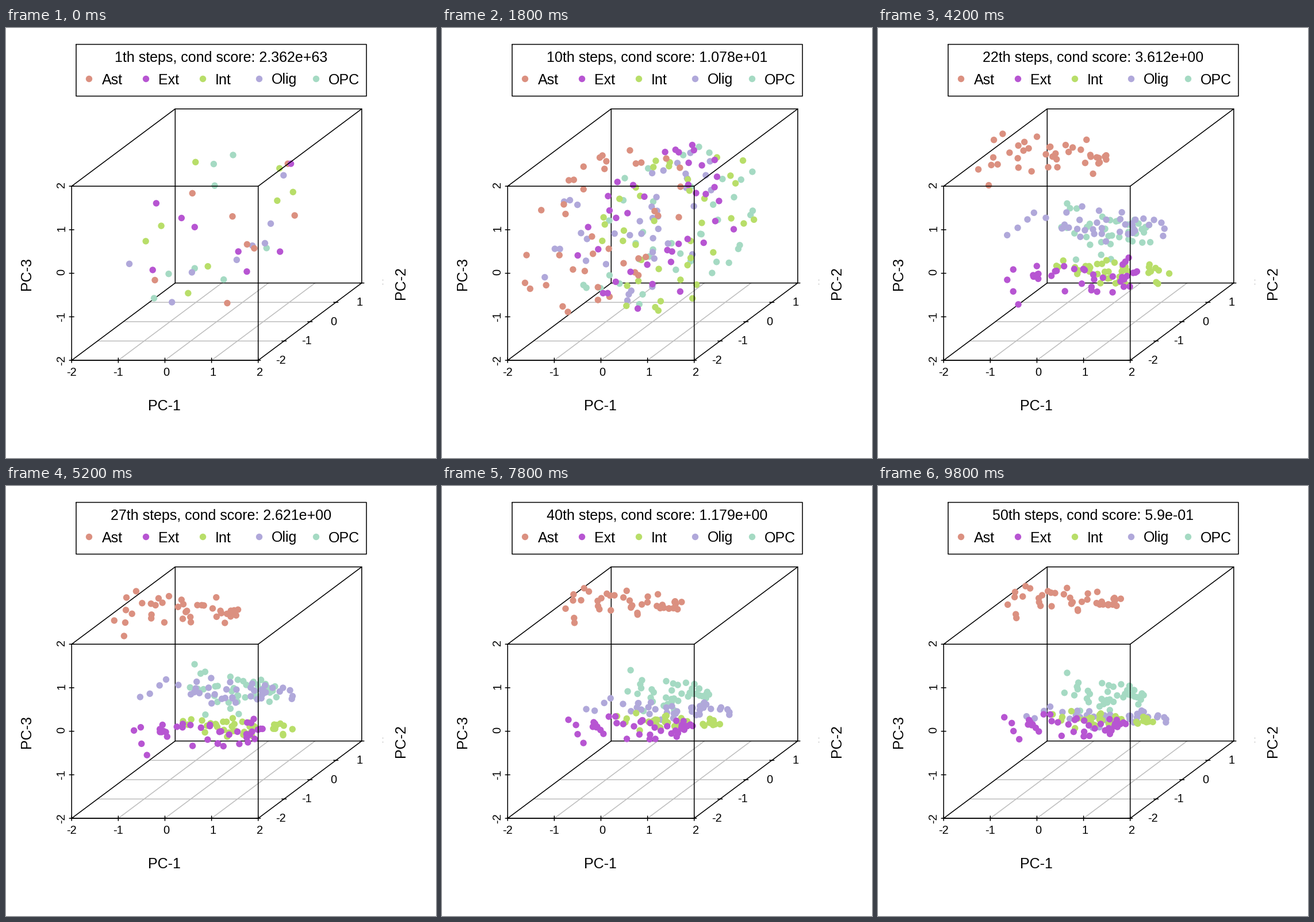
A matplotlib script that plays this animation: 748 px wide and 748 px high, repeating every 10 s.

```python
from collections import namedtuple

import numpy as np
import matplotlib.pyplot as plt
from matplotlib.animation import FuncAnimation

W = 748
DPI = 100
PX = 72 / DPI
STEPS = 50
CLOUD_STEP, SPLIT_STEP = 10, 14
PER_GROUP = 40
AT_START = 8
DOT = (11.4 * PX) ** 2

plt.rcParams["font.family"] = "Liberation Sans"

# cloud: x of the mixed cloud; span, level, spread: the final band;
# drift: how far from its final place a band first forms
Group = namedtuple("Group", "color cloud span level spread drift")
GROUPS = dict(
    Ast=Group("#DB9080", 290, (222, 424), 200, 12, (-47, 35)),
    Ext=Group("#B755D2", 380, (214, 443), 418, 10, (16, 25)),
    Int=Group("#B8DE69", 405, (300, 482), 407, 6, (16, 22)),
    Olig=Group("#B0A8DA", 325, (242, 508), 402, 9, (-26, -80)),
    OPC=Group("#A5DAC3", 395, (316, 466), 364, 14, (2, -12)),
)
DRAW_ORDER = ["OPC", "Olig", "Int", "Ast", "Ext"]

SCORE_STEPS = [10, 14, 22, 32, 40, 50]
SCORES = np.log10([10.78, 6.872, 3.612, 1.902, 1.179, 0.59])
FIRST_SCORE = np.log10(2.362e63)

rng = np.random.default_rng(7)


def ellipse(cx, cy, n):
    """Random dots in an ellipse that rises to the right."""
    angle = rng.uniform(0, 2 * np.pi, n)
    r = np.sqrt(rng.uniform(0, 1, n))
    a, b = 185 * r * np.cos(angle), 118 * r * np.sin(angle)
    c, s = np.cos(0.73), np.sin(0.73)
    return np.column_stack([cx + a * c + b * s, cy - a * s + b * c])


class Cluster:
    def __init__(self, group):
        lo, hi = group.span
        # Each band is denser and thinner towards its right end
        t = np.sort(rng.beta(1.5, 1.15, PER_GROUP))
        jitter = np.clip(rng.normal(size=(PER_GROUP, 2)), -1.8, 1.8)
        y = group.level + group.spread * (1.7 - 1.2 * t) * jitter[:, 1]
        self.final = np.column_stack([lo + (hi - lo) * t, y])
        self.middle = np.array([(lo + hi) / 2, group.level])
        self.drift = np.array(group.drift)
        self.wobble = np.clip(rng.normal(size=(PER_GROUP, 2)), -2, 2) * (9, 23)

        cloud = ellipse(group.cloud, 348, PER_GROUP)
        self.cloud = cloud[np.argsort(cloud[:, 0])]

        # Most dots come in from far outside the stage
        way = rng.uniform(0, 2 * np.pi, PER_GROUP)
        reach = rng.uniform(900, 2200, PER_GROUP)
        self.first = self.cloud + (reach * [np.cos(way), np.sin(way)]).T
        near = rng.choice(PER_GROUP, AT_START, replace=False)
        self.first[near] = ellipse(365, 350, AT_START)

    def band(self, step):
        k = ((STEPS - step) / (STEPS - SPLIT_STEP)) ** 1.4
        rel = (self.final - self.middle) * (1 + 0.15 * k, 1 + 0.4 * k)
        return self.middle + rel + k * self.drift + k * k * self.wobble

    def at(self, step):
        if step < CLOUD_STEP:
            k = ((CLOUD_STEP - step) / (CLOUD_STEP - 1)) ** 2
            return self.cloud + k * (self.first - self.cloud)
        if step < SPLIT_STEP:
            t = (step - CLOUD_STEP) / (SPLIT_STEP - CLOUD_STEP)
            return self.cloud + t * (self.band(SPLIT_STEP) - self.cloud)
        return self.band(step)


clusters = [Cluster(GROUPS[name]) for name in DRAW_ORDER]


def positions(step):
    p = np.vstack([c.at(step) for c in clusters])
    x, y = p.T
    shown = (x > 45) & (x < 686) & (y > 146) & (y < 573)
    return np.where(shown[:, None], p, -99)


def score_text(step):
    if step < CLOUD_STEP:
        k = ((CLOUD_STEP - step) / (CLOUD_STEP - 1)) ** 6
        power = SCORES[0] + (FIRST_SCORE - SCORES[0]) * k
    else:
        power = np.interp(step, SCORE_STEPS, SCORES)
    mantissa, exponent = f"{10 ** power:.3e}".split("e")
    return f"{mantissa.rstrip('0').rstrip('.')}e{exponent}"


# Whole coordinates fall on pixel centres
fig = plt.figure(figsize=(W / DPI, W / DPI), dpi=DPI, facecolor="white")
ax = fig.add_axes([0, 0, 1, 1])
ax.set_xlim(-0.5, W - 0.5)
ax.set_ylim(W - 0.5, -0.5)
ax.axis("off")


def line(*pts, color="black", z=2):
    xs, ys = zip(*pts)
    ax.plot(xs, ys, color=color, lw=1.55 * PX, zorder=z, snap=False,
            solid_capstyle="round", solid_joinstyle="round")


def label(x, y, text, size=25, ha="center", turn=0):
    return ax.text(x, y, text, fontsize=size * PX, ha=ha, va="baseline",
                   rotation=turn, rotation_mode="anchor", zorder=6)


# Corners: front left/right, back left/right, then their tops and bottoms
FL, FR, BL, BR = 113.7, 438.2, 293.8, 618.3
FT, FB, BT, BB = 274.7, 577.6, 140.2, 443.1
DX, DZ = (FR - FL) / 4, (FB - FT) / 4
SX, SY = (BL - FL) / 4, (FB - BB) / 4

for k in (1, 2, 3):
    line((FL + k * DX, FB), (BL + k * DX, BB), color="#BEBEBE", z=1)
    line((FL + k * SX, FB - k * SY), (FR + k * SX, FB - k * SY),
         color="#BEBEBE", z=1)

line((BL, BB), (BL, BT), (BR, BT), (BR, BB), (BL, BB))
line((BL, BB), (FL, FB), (FR, FB), (BR, BB))
line((FR, FB), (FL, FB), (FL, FT), (BL, BT))
line((FL, FT), (FR, FT), (FR, FB), z=4)
line((FR, FT), (BR, BT), z=4)

for k in range(5):
    x, z = FL + k * DX, FB - k * DZ
    depth_x, depth_y = FR + k * SX, FB - k * SY
    line((x, FB - 4), (x, FB + 4))
    line((FL - 4, z), (FL + 4, z))
    line((depth_x - 4, depth_y), (depth_x + 4, depth_y))
    # Unsigned numbers keep a blank in place of the minus
    pad = 0 if k < 2 else 2.7
    label(x + pad, 605, str(k - 2), 20)
    label(102, z - pad, str(k - 2), 20, turn=90)
    if k < 4:
        label(depth_x + 30 + 2 * pad, depth_y + 6, str(k - 2), 20, ha="left")

# Sliver of the cut-off last label
for y in (438, 445):
    line((654.6, y), (655.4, y), color="#C4C4C4")

label(275, 664.5, "PC-1")
label(694, 443, "PC-2", turn=90)
label(43, 427, "PC-3", turn=90)

line((121.5, 28), (626.5, 28), (626.5, 118), (121.5, 118), (121.5, 28))
for k, (name, group) in enumerate(GROUPS.items()):
    ax.scatter(143.8 + 98.7 * k, 88, s=DOT, color=group.color, lw=0, zorder=3)
    label(166 + 98.6 * k, 97, name, ha="left")

title = label(374, 58, "")
dots = ax.scatter(*positions(1).T, s=DOT, lw=0, zorder=3,
                  c=np.repeat([GROUPS[n].color for n in DRAW_ORDER], PER_GROUP))


def draw(frame):
    step = frame + 1
    dots.set_offsets(positions(step))
    title.set_text(f"{step}th steps, cond score: {score_text(step)}")
    return dots, title


anim = FuncAnimation(fig, draw, frames=STEPS, interval=200,
                     init_func=lambda: draw(0), repeat=True, blit=False)
plt.show()
```
